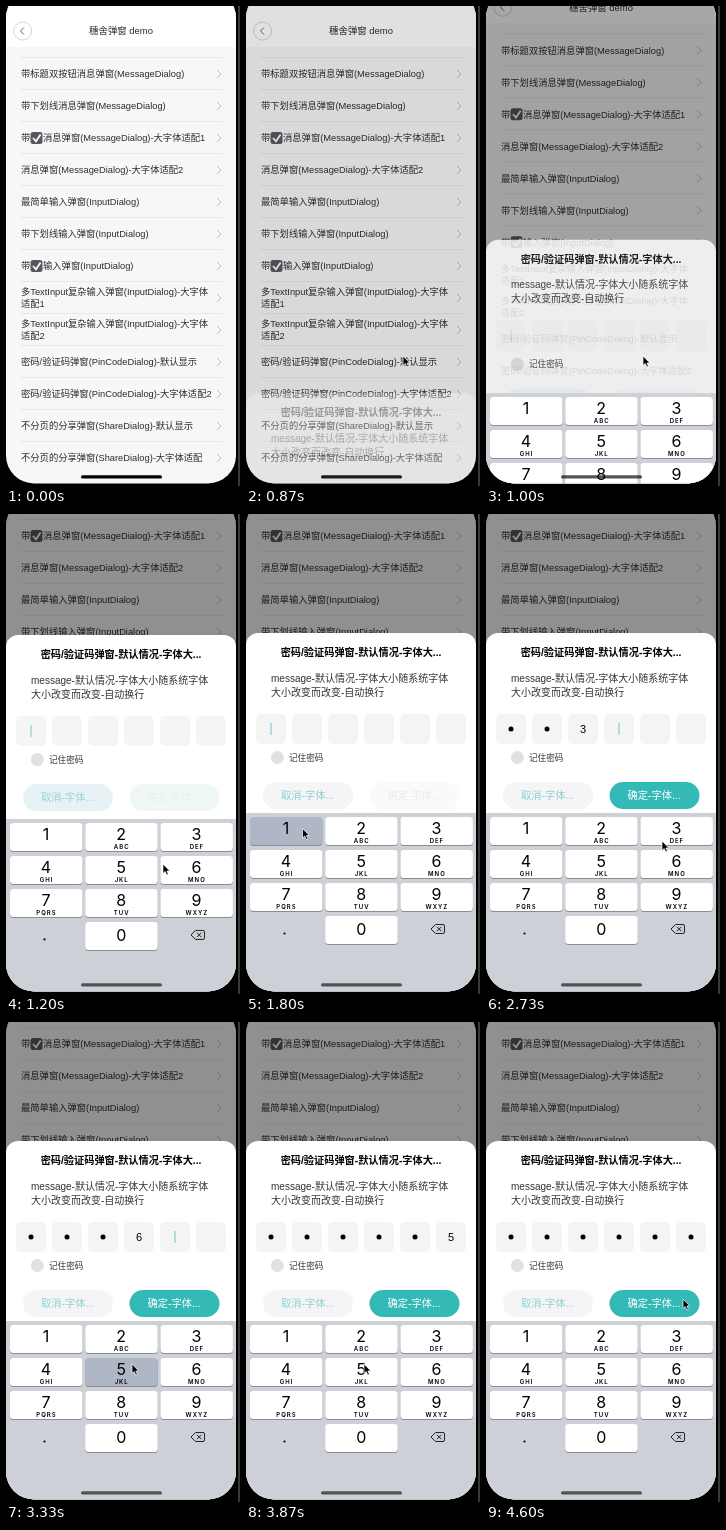
Animation of 234x480 px, one loop 4740 ms. Source, as an HTML page:

```html
<!DOCTYPE html>
<html lang="zh-CN">
<head>
<meta charset="utf-8">
<style>
html, body { margin: 0; height: 100%; overflow: hidden; background: #000; }
svg { display: block; width: 100vw; height: 100vh; font-family: "Liberation Sans", "Noto Sans CJK SC", "Noto Sans CJK", sans-serif; }
#keyboard { font-family: Inter, sans-serif; }
</style>
</head>
<body>
<svg id="stage" viewBox="0 0 234 480"></svg>
<script>
const LOOP = 4740, TEAL = '#34bab6';
const ROWS = [
  '带标题双按钮消息弹窗(MessageDialog)', '带下划线消息弹窗(MessageDialog)',
  '带☑消息弹窗(MessageDialog)-大字体适配1', '消息弹窗(MessageDialog)-大字体适配2',
  '最简单输入弹窗(InputDialog)', '带下划线输入弹窗(InputDialog)', '带☑输入弹窗(InputDialog)',
  '多TextInput复杂输入弹窗(InputDialog)-大字体|适配1', '多TextInput复杂输入弹窗(InputDialog)-大字体|适配2',
  '密码/验证码弹窗(PinCodeDialog)-默认显示', '密码/验证码弹窗(PinCodeDialog)-大字体适配2',
  '不分页的分享弹窗(ShareDialog)-默认显示', '不分页的分享弹窗(ShareDialog)-大字体适配'
];
const LETTERS = ['', 'ABC', 'DEF', 'GHI', 'JKL', 'MNO', 'PQRS', 'TUV', 'WXYZ'];
// key, time down, time up
const PRESSES = [[1, 1730, 1865], [2, 2200, 2330], [3, 2530, 2660], [6, 2930, 3060], [5, 3260, 3460], [5, 3720, 3860]];
const LAST_MASKED = 4125;
// start, end, x, y
const MOVES = [[250, 680, 157, 350], [1330, 1720, 56.5, 314.5], [1900, 2170, 118, 321], [2290, 2520, 176, 327],
  [2740, 2930, 180, 345], [3040, 3260, 126, 342], [3500, 3700, 118, 342], [4230, 4590, 197, 277]];

const $ = id => document.getElementById(id);
const clamp = v => Math.max(0, Math.min(1, v));
const ramp = (t, a, b) => clamp((t - a) / (b - a));
const smooth = p => p * p * (3 - 2 * p);
const text = (s, x, y, size, attrs = '') =>
  `<text x="${x}" y="${y + size * 0.36}" font-size="${size}" ${attrs}>${s}</text>`;
const rect = (x, y, w, h, r, fill, attrs = '') =>
  `<rect x="${x}" y="${y}" width="${w}" height="${h}" rx="${r}" fill="${fill}" ${attrs}/>`;
const line = (d, color, width = 1, attrs = '') =>
  `<path d="${d}" fill="none" stroke="${color}" stroke-width="${width}" ${attrs}/>`;
const MID = 'text-anchor="middle"';

function row(label, i) {
  const y = 68 + 32 * i, lines = label.split('|');
  let out = line(`M14 ${y - 16.5}H217`, '#e3e3e3', 0.7) + line(`M211 ${y - 4}l4 4l-4 4`, '#bdbdbd');
  lines.forEach((s, n) => {
    const ly = y + (n - (lines.length - 1) / 2) * 12;
    const [head, tail] = s.split('☑');
    out += text(head, 15, ly, 9.3);
    if (tail) out += rect(24.5, ly - 6, 12, 12, 2.5, '#565a5f') +
      line(`M27 ${ly}l3 3.3l4.6 -6.8`, '#fff', 1.7) + text(tail, 37, ly, 9.3);
  });
  return out;
}

function key(n) {
  const i = n ? n - 1 : 10, x = 4 + 75.2 * (i % 3), y = 303 + 33 * Math.floor(i / 3);
  return rect(x, y + 1, 72.5, 28, 3.5, '#8b8d92') + rect(x, y, 72.5, 28, 3.5, '#fff', `id="key${n}"`) +
    text(n, x + 36, y + (n ? 11 : 13.5), 16, MID) +
    (n ? text(LETTERS[n - 1], x + 36.5, y + 23.5, 6, MID + ' font-weight="600" letter-spacing="1"') : '');
}

const fieldX = i => 25 + 36 * i;
const fields = [0, 1, 2, 3, 4, 5].map(i => rect(fieldX(i) - 15, 200, 30, 30, 5, '#f4f4f4') +
  text('', fieldX(i), 215, 11, MID + ` id="digit${i}"`) +
  `<circle id="dot${i}" cx="${fieldX(i)}" cy="215" r="2.5"/>`).join('');

$('stage').innerHTML = `
<clipPath id="screen"><rect y="-16" width="230" height="493.5" rx="28"/></clipPath>
${rect(232, 0, 2, 480, 0, '#3a3a3a')}
<g clip-path="url(#screen)">
  ${rect(0, 0, 234, 480, 0, '#f7f7f7')}
  <g id="page" fill="#2c2c2c">
    ${rect(0, 0, 234, 41, 0, '#fff')}
    <circle cx="16.7" cy="25" r="9" fill="#fff" stroke="#ccc" stroke-width=".8"/>
    ${line('M18 21.5l-3.5 3.5l3.5 3.5', '#666')}
    ${text('穗舍弹窗 demo', 115, 25, 9.45, MID)}
    ${ROWS.map(row).join('')}
  </g>
  ${rect(0, 0, 234, 480, 0, '#000', 'id="dim"')}
  <g id="dialog">
    ${rect(0, 119, 230, 500, 12, '#fff')}
    ${text('密码/验证码弹窗-默认情况-字体大...', 115, 138, 10.2, MID + ' font-weight="600"')}
    <g fill="#333">
      ${text('message-默认情况-字体大小随系统字体', 25, 164, 10)}
      ${text('大小改变而改变-自动换行', 25, 178, 10)}
    </g>
    <g id="form">${fields}${line('M0 209v12', '#6cc3cb', 1, 'id="caret"')}
      ${rect(17, 268, 90, 27, 13.5, '#f5f5f5', 'id="cancel"')}
      ${text('取消-字体...', 61.5, 281.5, 10.3, MID + ' fill="#8ccfd3"')}
      ${rect(123.5, 268, 90, 27, 13.5, '#fafafa', 'id="confirm"')}
      ${text('确定-字体...', 168, 281.5, 10.3, MID + ' id="confirmText"')}
    </g>
    <circle cx="31.3" cy="243.5" r="6.5" fill="#e1e1e1"/>
    ${text('记住密码', 43, 243.5, 8.6, 'fill="#333"')}
  </g>
  <g id="keyboard">
    ${rect(0, 299, 234, 190, 0, '#cdd0d6')}
    ${[1, 2, 3, 4, 5, 6, 7, 8, 9, 0].map(key).join('')}
    <circle cx="38.5" cy="419.5" r="1.1"/>
    ${line('M185 415l4.5 -4.5h7.5q1.5 0 1.5 1.5v6q0 1.5 -1.5 1.5h-7.5zM191 412.8l4.4 4.4m0 -4.4l-4.4 4.4', '#222')}
  </g>
  ${rect(75, 469.3, 81, 3.2, 1.6, '#000', 'id="homeBar"')}
</g>
<path id="cursor" d="M0 0V9.5L2.2 7.5L3.8 11L5.4 10.3L3.9 7H6.8Z" stroke="#fff" stroke-width=".7"/>`;

const set = (id, name, value) => $(id).setAttribute(name, value);
const show = (id, on) => set(id, 'visibility', on ? 'visible' : 'hidden');
const shift = (id, x, y) => set(id, 'transform', `translate(${x} ${y})`);

function draw(t) {
  const scroll = 110 * smooth(ramp(t, 920, 1190));
  const fade = ramp(t, 800, 1045);
  const spring = Math.max(0, t - 903.5) * 0.01765;
  shift('page', 0, -scroll);
  set('dim', 'opacity', 0.42 * fade);
  set('homeBar', 'opacity', 1 - 0.4 * fade);
  set('dialog', 'opacity', fade);
  shift('dialog', 0, 110 - scroll + 29 * Math.exp((1000 - t) / 76));
  shift('keyboard', 0, 181 * (1 + spring) * Math.exp(-spring));
  set('form', 'opacity', ramp(t, 800, 1250));

  for (let n = 0; n < 10; n++) {
    const down = PRESSES.some(([k, a, b]) => k === n && t >= a && t < b);
    set('key' + n, 'fill', down ? '#afb7c6' : '#fff');
  }

  const count = PRESSES.filter(p => t >= p[2]).length;
  for (let i = 0; i < 6; i++) {
    const masked = i < count - 1 || t >= LAST_MASKED;
    show('dot' + i, masked);
    $('digit' + i).textContent = i < count && !masked ? PRESSES[i][0] : '';
  }
  show('caret', count < 6);
  shift('caret', fieldX(count), 0);
  set('cancel', 'fill', t < 1300 ? '#e3f1f2' : '#f5f5f5');
  set('confirm', 'fill', count ? TEAL : t < 1300 ? '#eef7f7' : '#fafafa');
  set('confirmText', 'fill', count ? '#fff' : '#e6eded');

  let x = 240, y = 422;
  for (const [a, b, tx, ty] of MOVES) {
    const p = smooth(ramp(t, a, b));
    x += (tx - x) * p;
    y += (ty - y) * p;
  }
  shift('cursor', x, y);
}

function tick() {
  draw(performance.now() % LOOP);
  requestAnimationFrame(tick);
}
tick();
</script>
</body>
</html>
```
